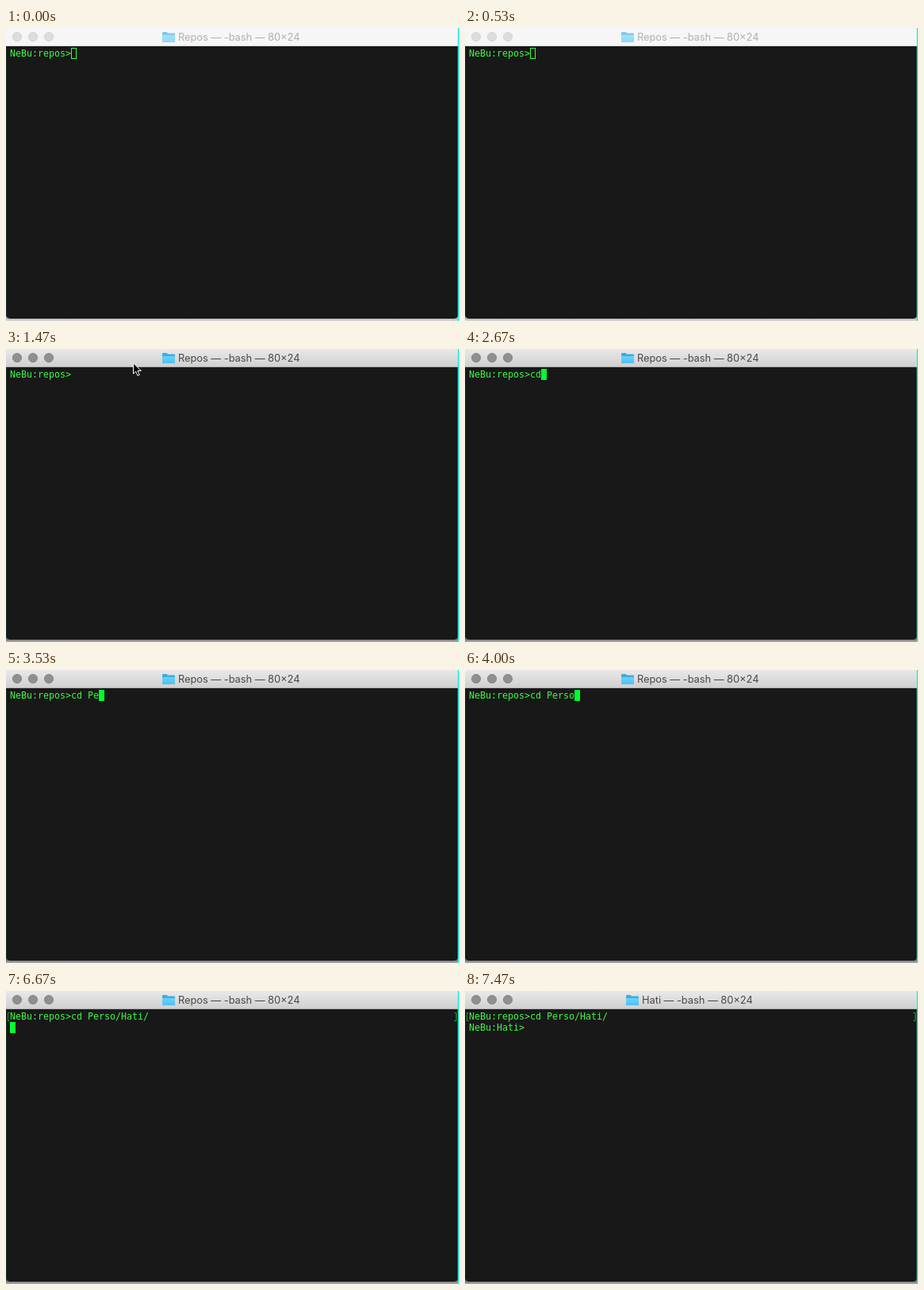
Write an HTML page with a canvas that moves like this. It is 571 by 369 pixels and loops after 8000 ms.

```html
<!DOCTYPE html>
<html>
<head>
<meta charset="utf-8">
<style>
html, body { margin: 0; width: 571px; height: 369px; overflow: hidden; }
canvas { display: block; }
</style>
</head>
<body>
<canvas id="stage" width="571" height="369"></canvas>
<script>
const ctx = document.getElementById('stage').getContext('2d');
const LOOP = 8000, CELL = 7, ROW = 14, LEFT = 5, TOP = 25;
const USER = 'NeBu';
const GREEN = '#3cfb46', CURSOR = '#00ff2c';

const FOCUS = 1470, COMPLETE = 4270, ENTER = 6670, PROMPT = 6800;

// [time, command text from then on]
const typing = [
  [0, ''], [2530, 'c'], [2670, 'cd'], [2930, 'cd '], [3270, 'cd P'],
  [3530, 'cd Pe'], [3670, 'cd Per'], [3870, 'cd Pers'], [4000, 'cd Perso'],
  [COMPLETE, 'cd Perso/'], [5130, 'cd Perso/H'], [5470, 'cd Perso/Hati/']
];

// spans in which the blinking cursor is dark
const dark = [[1470, 2000], [2470, 2530], [5000, 5130], [6000, 6470], [7470, 8000]];

// pointer places while it travels to the title bar
const pointerPath = [[730, 480, 270], [800, 370, 175], [870, 265, 90], [930, 190, 38], [1000, 160, 17]];
const POINTER_END = 2530;

const latest = (list, t) => list.filter(step => step[0] <= t).pop();

function rect(x, y, w, h, fill) {
  ctx.fillStyle = fill;
  ctx.fillRect(x, y, w, h);
}

function gradient(y0, y1, from, to) {
  const g = ctx.createLinearGradient(0, y0, 0, y1);
  g.addColorStop(0, from);
  g.addColorStop(1, to);
  return g;
}

function shape(d, x, y, fill, stroke) {
  const path = new Path2D(d);
  ctx.save();
  ctx.translate(x, y);
  if (fill) { ctx.fillStyle = fill; ctx.fill(path); }
  if (stroke) { ctx.strokeStyle = stroke; ctx.lineWidth = 1; ctx.stroke(path); }
  ctx.restore();
}

function folder(x, active) {
  const [back, top, bottom] = active
    ? ['#3fabdf', '#6bd2fb', '#4fc0f2'] : ['#83c9e8', '#a1e2fb', '#8ed7f7'];
  shape('M0 2Q0 1 1 1H5.5L7 2.5H15Q16 2.5 16 3.5V13Q16 14 15 14H1Q0 14 0 13Z', x, 4, back);
  shape('M0 5H16V13Q16 14 15 14H1Q0 14 0 13Z', x, 4, gradient(5, 14, top, bottom));
}

function drawFrame(active) {
  rect(0, 0, 571, 369, active ? gradient(365, 369, '#686868', '#b0b0b0')
                              : gradient(365, 369, '#a4a4a4', '#dedede'));
  ctx.beginPath();
  ctx.roundRect(0, 0, 570, 366, [0, 0, 5, 5]);
  ctx.fillStyle = '#181818';
  ctx.fill();
  rect(0, 23, 1, 338, '#17301f');
  rect(0, 0, 570, 22, active ? gradient(0, 22, '#e9e9e9', '#d0d0d0') : '#f6f6f6');
  rect(0, 22, 570, 1, active ? '#aeaeae' : '#d6d6d6');
  rect(569.5, 0, 1.5, 369, '#20f4d4');
}

function drawTitle(name, x, active) {
  for (const cx of [14, 34, 54]) {
    ctx.beginPath();
    ctx.arc(cx, 11, 5.6, 0, 7);
    ctx.fillStyle = active ? '#8f8f8f' : '#dddddd';
    ctx.fill();
    ctx.strokeStyle = active ? '#7b7b7b' : '#cecece';
    ctx.lineWidth = 0.8;
    ctx.stroke();
  }
  folder(x, active);
  ctx.font = '12.8px Inter, sans-serif';
  ctx.fillStyle = active ? '#484848' : '#b0b0b0';
  ctx.fillText(name + ' — -bash — 80×24', x + 20, 16);
}

function line(text, row) {
  ctx.font = '11.63px "DejaVu Sans Mono", monospace';
  ctx.fillStyle = GREEN;
  ctx.fillText(text, LEFT, TOP + 11 + row * ROW);
}

function cursor(col, row, solid) {
  const x = LEFT + col * CELL, y = TOP + row * ROW;
  if (solid) return rect(x, y, CELL, ROW, CURSOR);
  ctx.strokeStyle = GREEN;
  ctx.lineWidth = 1;
  ctx.strokeRect(x + 0.5, y + 0.5, CELL - 1, ROW - 1);
}

function draw(t) {
  const active = t >= FOCUS, arrived = t >= PROMPT;
  drawFrame(active);
  drawTitle(arrived ? 'Hati' : 'Repos', arrived ? 203 : 197, active);

  const first = USER + ':repos>' + latest(typing, t)[1];
  const second = arrived ? USER + ':Hati>' : '';
  line(first, 0);
  line(second, 1);
  if (t >= COMPLETE) {
    shape('M2.5 .5H.5V10.5H2.5', 2, 27, null, '#2b9a3c');
    shape('M0 .5H2.5V10.5H0', 565, 27, null, '#2b9a3c');
  }

  if (!dark.some(([from, to]) => t >= from && t < to)) {
    const row = t >= ENTER ? 1 : 0;
    cursor((row ? second : first).length, row, active);
  }

  const place = latest(pointerPath, t);
  if (place && t < POINTER_END) {
    shape('M.5 .8V14.2L3.6 11.3L6 16.6L8.2 15.6L5.9 10.5H10.2Z', place[1], place[2], '#000', '#fff');
  }
}

const start = performance.now();
function tick() {
  draw((performance.now() - start) % LOOP);
  requestAnimationFrame(tick);
}
tick();
</script>
</body>
</html>
```
